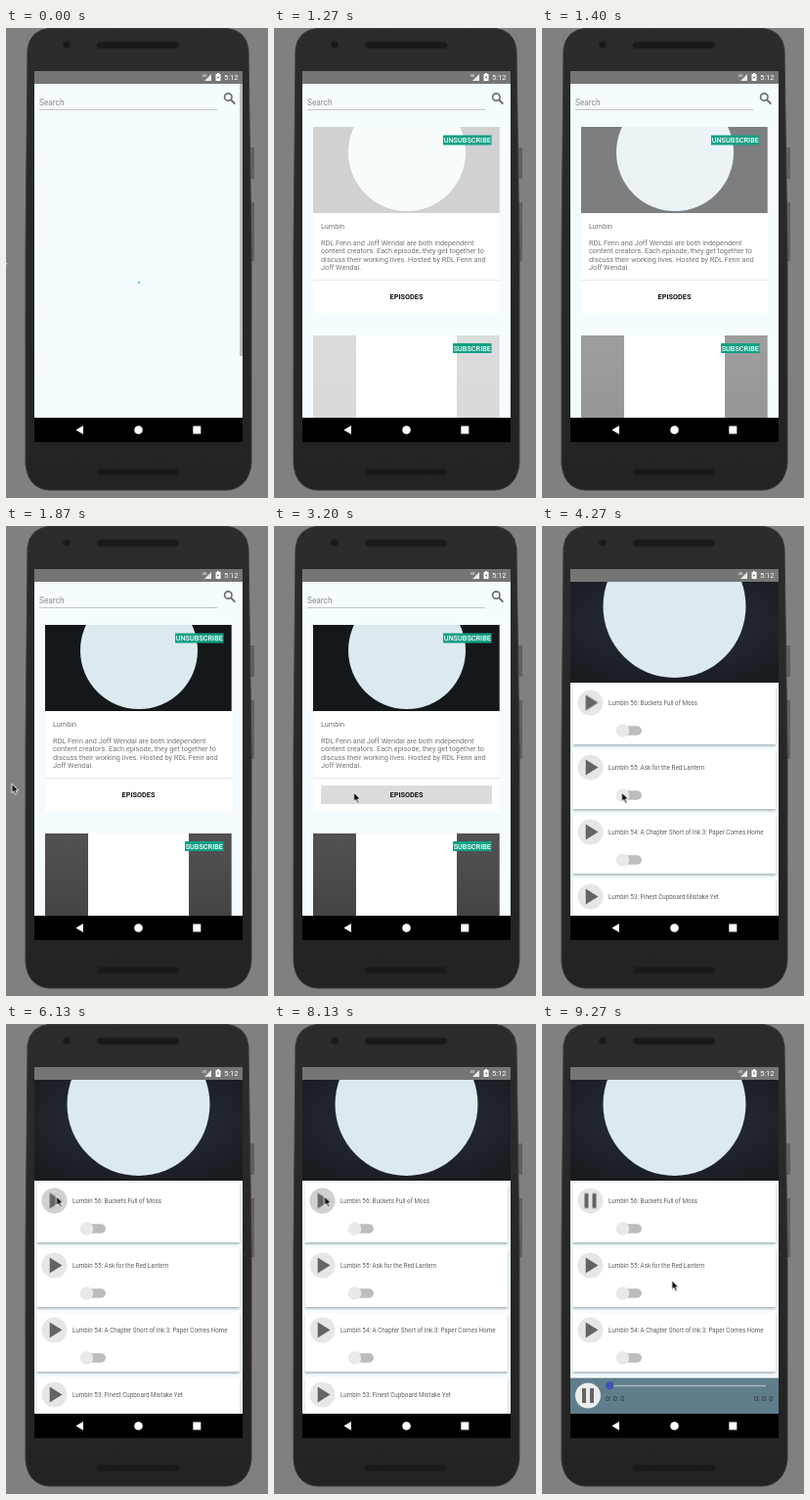
An HTML page that plays this animation: 268x480 px, repeating every 9470 ms.

```html
<!DOCTYPE html>
<html lang="en">
<head>
<meta charset="utf-8">
<title>Podcast app</title>
<style>
  html, body { margin: 0; width: 100%; height: 100%; overflow: hidden; background: #808080; }
  svg { display: block; width: 100vw; height: 100vh; }
  text { font-family: Roboto, "Open Sans", sans-serif; font-size: 7.3px; fill: #747474; }
  .bold { font-weight: 700; }
  .title { font-size: 6.3px; fill: #606060; }
  .label { font-weight: 500; fill: #fff; font-size: 7.3px; }
</style>
</head>
<body>
<svg viewBox="0 0 268 480" preserveAspectRatio="none">
  <defs>
    <linearGradient id="body" x2="0" y2="1">
      <stop offset="0" stop-color="#2c2c2c"/><stop offset="1" stop-color="#232323"/>
    </linearGradient>
    <radialGradient id="night" cx=".5" cy=".4" r=".7">
      <stop offset="0" stop-color="#2a323a"/><stop offset="1" stop-color="#181b20"/>
    </radialGradient>
    <linearGradient id="slate" x2="0" y2="1">
      <stop offset="0" stop-color="#525252"/><stop offset="1" stop-color="#434343"/>
    </linearGradient>
    <filter id="shade" x="-5%" y="-10%" width="110%" height="125%">
      <feDropShadow dx="0" dy="1.8" stdDeviation="1.3" flood-color="#5a6c78" flood-opacity=".48"/>
    </filter>
    <clipPath id="screen"><rect x="29" y="57" width="213" height="341"/></clipPath>
    <clipPath id="cover"><rect x="40" y="101" width="190.700" height="88"/></clipPath>
    <clipPath id="banner"><rect x="29" y="57" width="213" height="103"/></clipPath>
    <path id="play" d="M-4.800 -8L8 0L-4.800 8Z" fill="#646464"/>
    <path id="pause" d="M-6 -7.5h4v15h-4zM2 -7.5h4v15h-4z" fill="#646464"/>
  </defs>

  <!-- handset -->
  <rect width="268" height="480" fill="#808080"/>
  <path d="M250 122h4v32h-4zM250 178h4v60h-4z" fill="#606060"/>
  <path d="M46 0H224Q246 2 248 22L251 230V445Q248 470 226 472H44Q22 470 20 445V230L22 22Q24 2 46 0Z" fill="url(#body)" stroke="#3a3a3a"/>
  <g fill="#191919" stroke="#222">
    <rect x="93" y="14" width="84" height="7" rx="3.500"/>
    <rect x="93" y="450" width="84" height="7" rx="3.500"/>
    <circle cx="62" cy="17" r="3.600"/>
  </g>
  <rect x="29" y="44" width="213" height="13" fill="#757575"/>
  <g fill="#fff">
    <path d="M210 47v7h-7z" opacity=".85"/>
    <text x="200.500" y="50" style="font-size:4px;fill:#fff">4G</text>
    <path d="M216 46h2v1h1.500v7h-5v-7h1.500z"/>
    <path d="M217.400 48l-1.600 2.800h1l-.3 2 1.700-2.800h-1z" fill="#757575"/>
    <text x="223" y="53" style="fill:#fff;font-size:7.500px">5:12</text>
  </g>

  <g clip-path="url(#screen)">
    <rect x="29" y="57" width="213" height="341" fill="#f5fcff"/>
    <g id="list">
      <text x="34" y="78.500" style="font-size:8.300px;fill:#8c8c8c">Search</text>
      <path d="M34 83.500H216" stroke="#c2c6c8"/>
      <g fill="none" stroke="#6a6e71">
        <circle cx="227.300" cy="70.500" r="3.700" stroke-width="1.700"/>
        <path d="M230 73.300L234.300 77.600" stroke-width="2"/>
      </g>
      <rect id="bar" x="239" y="57" width="3" height="278" fill="#b9bfc2"/>
      <g transform="translate(135 267)"><g id="spin">
        <circle id="arc" r="7" fill="none" stroke="#35bfc0" stroke-width="2" pathLength="100" transform="rotate(-90)"/>
      </g></g>
      <g id="cards">
        <rect x="40" y="101" width="190.700" height="190" fill="#fff"/>
        <rect x="40" y="314" width="190.700" height="90" fill="#fff"/>
        <g id="art1" clip-path="url(#cover)">
          <rect x="40" y="101" width="190.700" height="88" fill="#15181b"/>
          <circle cx="136" cy="127" r="60" fill="#dceaf0"/>
        </g>
        <g id="art2">
          <rect x="40" y="314" width="190.700" height="90" fill="url(#slate)"/>
          <rect x="84" y="314" width="103" height="103" fill="#fff"/>
        </g>
        <rect x="173" y="109.500" width="49.500" height="10" fill="#12a085"/>
        <text class="label" x="197.800" y="117.200" text-anchor="middle">UNSUBSCRIBE</text>
        <rect x="183" y="322" width="39.500" height="10" fill="#12a085"/>
        <text class="label" x="202.800" y="329.800" text-anchor="middle">SUBSCRIBE</text>
        <text x="48" y="204.500">Lumbin</text>
        <g id="about"></g>
        <path d="M40 257.500H230.700" stroke="#e6eaec"/>
        <rect id="press" x="48" y="265" width="175" height="19" rx="1.500" fill="#dcdcdc"/>
        <text class="bold" x="135.500" y="277.300" text-anchor="middle" style="fill:#111">EPISODES</text>
      </g>
    </g>

    <g id="show">
      <rect x="29" y="57" width="213" height="341" fill="#f5fcff"/>
      <g clip-path="url(#banner)">
        <rect x="29" y="57" width="213" height="103" fill="url(#night)"/>
        <circle cx="135.500" cy="82" r="73" fill="#dceaf0"/>
      </g>
      <g id="episodes"></g>
      <g id="player">
        <rect x="29" y="361.500" width="213" height="37" fill="#607d8b"/>
        <circle cx="47" cy="379.500" r="13" fill="#ececec"/>
        <use href="#pause" x="47" y="379.500"/>
        <path d="M69 369.500H229" stroke="#a9b8bf" stroke-width="1.300"/>
        <circle cx="69.300" cy="369.300" r="4" fill="#3f51b5"/>
        <text x="65" y="385" style="fill:#2c3438">0: 0: 0</text>
        <text x="217" y="385" style="fill:#2c3438">0: 0: 0</text>
      </g>
    </g>
  </g>

  <rect x="29" y="398" width="213" height="25" fill="#000"/>
  <path d="M71.400 410.500L79 406V415ZM191.300 406.500h8v8h-8z" fill="#fff"/>
  <circle cx="135.500" cy="410.500" r="4.300" fill="#fff"/>

  <g id="pointer">
    <path d="M0 0V9.500L2.200 7.500L3.900 11.200L5.600 10.400L4 6.900H7Z" fill="#111" stroke="#fff" stroke-width=".9"/>
  </g>
</svg>

<script>
const LOOP = 9470;
const $ = id => document.getElementById(id);

const about = [
  'RDL Fenn and Joff Wendal are both independent',
  'content creators. Each episode, they get together to',
  'discuss their working lives. Hosted by RDL Fenn and',
  'Joff Wendal.'
];
$('about').innerHTML = about
  .map((line, i) => `<text x="48" y="${222 + i * 8.25}">${line}</text>`).join('');

const titles = [
  'Buckets Full of Moss',
  'Ask for the Red Lantern',
  'A Chapter Short of Ink 3: Paper Comes Home',
  'Finest Cupboard Mistake Yet'
];
$('episodes').innerHTML = titles.map((title, i) => `
  <g transform="translate(0 ${i * 66})">
    <rect x="31.500" y="163" width="207.500" height="60" rx="1" fill="#fff" filter="url(#shade)"/>
    <circle cx="49.500" cy="180.500" r="13" fill="#e6e6e6"/>
    ${i ? '' : '<circle id="touch" cx="49.500" cy="180.500" r="13" fill="#d0d0d0"/>'}
    <use ${i ? '' : 'id="idle"'} href="#play" x="49.500" y="180.500"/>
    ${i ? '' : '<use id="playing" href="#pause" x="49.500" y="180.500"/>'}
    <text class="title" x="68" y="182.700">Lumbin ${56 - i}: ${title}</text>
    <rect x="79" y="204.300" width="23" height="9.400" rx="4.700" fill="#bdbdbd"/>
    <circle cx="82.500" cy="209" r="6.800" fill="#e9e9e9"/>
  </g>`).join('');

// Steps are [ms, value, easing]; the first and last values are held.
function animate(id, prop, steps) {
  const all = [[0, steps[0][1]], ...steps, [LOOP, steps.at(-1)[1]]];
  const frames = all.map(([ms, value, easing = 'linear']) =>
    ({ offset: ms / LOOP, [prop]: value, easing }));
  $(id).animate(frames, { duration: LOOP, iterations: Infinity }).startTime = 0;
}
const fade = (id, ...steps) => animate(id, 'opacity', steps);
const flip = (id, ms, on) => fade(id, [ms, 1 - on], [ms, on]);
const move = (id, ...steps) => animate(id, 'transform',
  steps.map(([ms, x, y, easing]) => [ms, `translate(${x}px, ${y}px)`, easing]));

// loading
fade('bar', [270, 1], [530, 0]);
flip('spin', 1065, 0);
animate('spin', 'transform', [[0, 'rotate(0deg)'], [1065, 'rotate(290deg)']]);
animate('arc', 'strokeDasharray', [
  [0, '4 96'], [60, '4 96', 'ease-in-out'], [660, '72 28', 'ease-in-out'], [1065, '25 75']
]);
flip('cards', 1065, 1);
for (const id of ['art1', 'art2']) fade(id, [1200, 0], [1560, 1]);

// open the episodes
fade('press', [2590, 0], [2730, 1]);
const slide = 'cubic-bezier(.42, 0, .58, 1)';
move('list', [3645, 0, 0, slide], [4250, -213, 0]);
move('show', [3645, 213, 0, slide], [4250, 0, 0]);

// start playback
fade('touch', [6125, 0], [6125, 1], [8130, 1], [8530, 0]);
flip('idle', 8265, 0);
flip('playing', 8265, 1);
flip('player', 8265, 1);

move('pointer',
  [0, -6, 234], [65, -6, 234], [65, -20, 250], [1865, -20, 250],
  [1865, 5.5, 263], [1930, 9, 265], [2130, 52, 275], [2270, 74, 276], [2400, 81.5, 272],
  [4790, 81.5, 272], [5000, 112, 226], [5200, 121, 172], [5400, 92, 141],
  [5600, 54, 160], [5670, 47, 172], [5730, 50.5, 177], [5800, 51.5, 176],
  [8700, 51.5, 176, 'ease-in-out'], [9270, 132.8, 261.8]);
</script>
</body>
</html>
```
